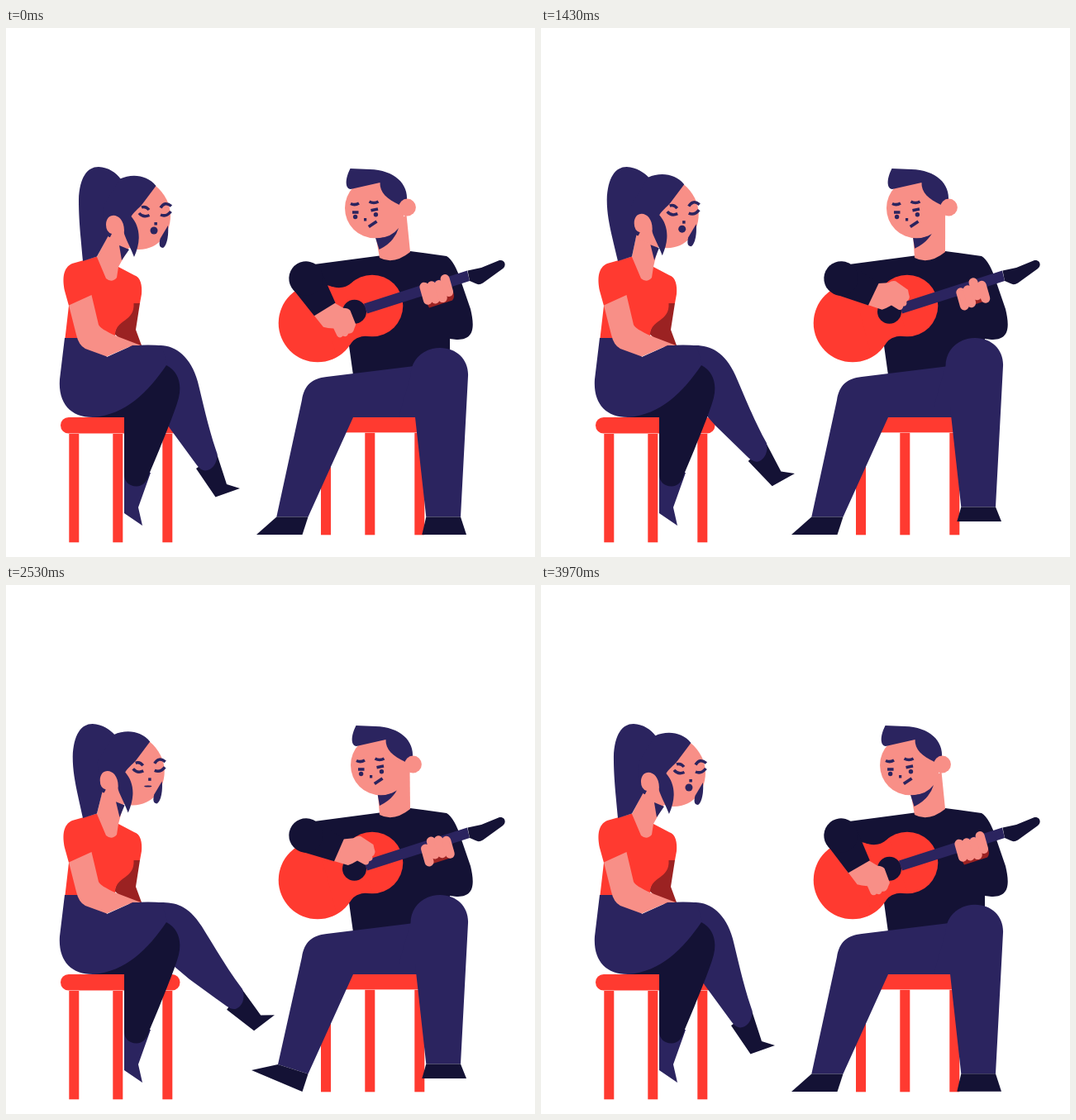
Animation, 640 px wide and 640 px high, one loop 4010 ms. Source, as an HTML page:

```html
<!DOCTYPE html>
<html lang="en">
<head>
<meta charset="utf-8">
<title>Singer and guitarist</title>
<style>
html, body { margin: 0; width: 100%; height: 100%; overflow: hidden; background: #fff; }
svg { display: block; width: 100%; height: 100%; }
</style>
</head>
<body>
<svg id="stage" viewBox="0 0 640 640"></svg>
<script>
const NAVY = '#2b245f', DARK = '#141235', SKIN = '#f88f87', RED = '#ff3a30', SHADE = '#9b2222';
const LOOP = 4010, BEATS = 50; // two identical bars of 50 beats per loop
const stage = document.getElementById('stage');

const path = (fill, d) => `<path fill="${fill}" d="${d}"/>`;
const line = (color, width, d, cap = 'butt') =>
  `<path fill="none" stroke="${color}" stroke-width="${width}" stroke-linecap="${cap}" d="${d}"/>`;
const oval = (fill, x, y, rx, ry = rx) => `<ellipse fill="${fill}" cx="${x}" cy="${y}" rx="${rx}" ry="${ry}"/>`;
const rect = (fill, x, y, w, h, r = 0) =>
  `<rect fill="${fill}" x="${x}" y="${y}" width="${w}" height="${h}" rx="${r}"/>`;
const group = (transform, body) => `<g transform="${transform}">${body}</g>`;
const mix = (a, b, k) => a + (b - a) * k;
const sine = x => (1 - Math.cos(Math.PI * x)) / 2;
const steep = x => x ** 4.6 / (x ** 4.6 + (1 - x) ** 4.6);

// Eased value at beat b from [beat, value] pairs
function keyed(b, keys, ease = sine) {
  if (b <= keys[0][0]) return keys[0][1];
  for (let i = 1; i < keys.length; i++) {
    const [b0, v0] = keys[i - 1], [b1, v1] = keys[i];
    if (b <= b1) return mix(v0, v1, ease((b - b0) / (b1 - b0)));
  }
  return keys[keys.length - 1][1];
}

function stools() {
  const legs = (xs, y, h) => xs.map(x => rect(RED, x, y, 12, h)).join('');
  return rect(RED, 66, 471, 144.5, 19.6, 9.8) + legs([76.3, 129.3, 189.3], 491, 131.3) +
    rect(RED, 395, 471, 108, 18.4) + legs([381, 434.3, 494.3], 489.8, 123.5);
}

function swingingLeg(angle) {
  const c = Math.cos(angle), s = Math.sin(angle);
  const at = (x, y) => {
    const dx = x - 187, dy = y - 405;
    return `${187 + dx * c + dy * s},${405 - dx * s + dy * c} `;
  };
  return path(DARK, `M${at(255, 515)}L${at(267, 552)}L${at(283, 557)}L${at(253.5, 567.5)}L${at(230, 533)}Z`) +
    path(NAVY, `M150,384 L187,384 C205,384 ${at(224, 398)}${at(232, 428)}C${at(238, 452)}${at(245, 485)}${at(255.5, 515)}` +
      `C${at(256, 527)}${at(249, 535)}${at(241, 535.5)}Q${at(236, 535.5)}${at(231, 529)}L${at(198, 484)}L${at(180, 455)}Z`);
}

function girlHead(h, mouth) {
  const x = -13.5 * h, y = -3 * h;
  const at = (px, py, kx = 1, ky = 1) => `${px + x * kx},${py + y * ky} `;
  const neck = path(SKIN, `M110,277 L${at(124, 250)}L${at(151, 262)}L136,289 L134,302 Q128,309 121,303Z`) +
    path(NAVY, `M${at(137, 263, .55, .4)}L${at(149, 268, .75)}L${at(140, 281, .35, 0)}Z`);
  const tail = path(NAVY, `M93,282 C${at(90, 250, .55, 0)}${at(88, 230, 1, 0)}${at(88, 208, 1, 0)}C${at(89, 181, 1, 0)}${at(98, 168, 1, 0)}` +
    `${at(112, 168, 1, 0)}C${at(124, 168.5, 1, 0)}${at(133, 175, 1, 0)}${at(139, 183)}L${at(143, 225)}L${at(124, 251)}L110,276.5Z`);
  const face = group(`translate(${x} ${y})`,
    path(SKIN, 'M181,191 C192,200 199,213 199,227 C199,250 183,268.5 160,268 C150,267.5 142,264 136,259 L138,215Z') +
    path(NAVY, 'M138,182.5 C152,176 171,177.5 181.5,191 L165,213 C160,219 154,223 151.5,228 C162,240 164,257 155,277 C150,264 145,256 142,246 L120,250 L118,215Z') +
    oval(NAVY, 126.5, 249, 4.2) +
    path(SKIN, 'M121,238 C121,221 143,223 143,245 L141,263 L124,257 L128,249 Q121,247 121,238Z') +
    path(NAVY, 'M196,239 C197,250 195,263 190,266 C185,266 185,261 186.5,255Z') +
    line(NAVY, 3.5, 'M187,217.5 Q192,209 200,215.5 M164,217 Q169,215 173,220') +
    line(NAVY, 3.5, 'M161,224 Q166,230 173.5,226.5 M187,226 Q194,229 199.5,222') +
    rect(NAVY, 179.4, 235, 3.5, 3.5) +
    oval(NAVY, 179, 245, 4.5, mouth));
  return neck + tail + face;
}

function girl(h, swing, mouth) {
  return swingingLeg(swing) +
    path(SHADE, 'M150,333 L162,333 L157,365 L164,384 L150,386 L131,370 L138,350Z') +
    path(NAVY, 'M71,375 L65,425 C63,454 78,471 105,471 L143,471 L196,409 L188,384.3 Q178,383 153,384 L122,398 L116,375Z') +
    path(NAVY, 'M143,535 L143,587 L165,602 L160,580 L175,538Z') +
    path(DARK, 'M105,471 C145,468 172,440 194,408 C208,415 213,430 209,447 C206,460 190,500 173,540 C171,549 165,554.5 158,554.5 C148,554.5 143,548 143,540 L143,471Z') +
    path(RED, 'M80,285 L110,276.5 L136,289 L155,299 C163,301 165,312 164,322 L162,333 L154.5,333 C156,356 132,352 132,372 L128,375 H71.5 L76,336 L71,318 C68,303 69,290 80,285Z') +
    path(SKIN, 'M76,335.5 L103.5,323 L112,359 Q114,364 133,372.5 L163,384 L153,384 L122,397.5 L96,388 Q88,384 85,371Z') +
    girlHead(h, mouth);
}

function guyHead(h, blink) {
  const x = 13 * h;
  const neck = path(SKIN, `M${447 + 5 * h},250 L452,278 Q469,287 489,271 L${484.5 + 7.5 * h},226Z`);
  const jaw = path(NAVY, `M${447 + 5 * h},254 Q${465 - 2 * h},${255 - h} ${475 - 3 * h},${242 + 10 * h} ` +
    `Q${470 - 6 * h},${259 + 2 * h} ${451.5 + h},${268 - 2 * h}Z`);
  const brow = 4 * blink, lid = 3.3 * blink;
  const face = group(`translate(${x} 0)`,
    oval(SKIN, 446.3, 218, 36.3) +
    path(NAVY, 'M416.5,170 L440,171 C470,172 487,188 485,210 L476,214 C461,207 452,199 452.5,187 L417,195 C410,194 410,183 416.5,170Z') +
    oval(SKIN, 485.5, 217, 10.4) +
    line(NAVY, 3.5, `M417,${212.5 + brow} Q422,${215 + brow} 427,${212 + brow} M439.5,${210 + brow} Q445,${213 + brow} 450.5,${210 + brow}`) +
    line(NAVY, 3.5, `M419,${223 + lid} h7.5 M441.5,${220.8 + lid} l8.5,-1.8`) +
    (blink < .95 ? oval(NAVY, 422.6, 228.5, 2.7, 2.7 * (1 - blink)) + oval(NAVY, 447.4, 225.8, 2.7, 2.7 * (1 - blink)) : '') +
    rect(NAVY, 433, 230, 3.2, 3.5) +
    line(NAVY, 3.8, 'M438.8,240.5 L448.5,234'));
  return neck + jaw + face;
}

function guyLegs(tapLeft, tapRight) {
  const up = 12 * tapRight, sole = 613 - 16 * tapRight;
  const ankle = `${mix(327.3, 329, tapLeft)},${mix(591.5, 580, tapLeft)}`;
  const toe = `${mix(303, 297, tapLeft)},${mix(613, 587, tapLeft)}`;
  return path(NAVY, `M520,405 L490,409.5 L388,422 C370,424 361,432 358,450 L${ankle} L365.5,591.5 L420,471 L520,471Z`) +
    path(DARK, `M${ankle} L365.5,591.5 L358.5,613 L${toe}Z`) +
    group(`translate(0 ${-up})`,
      path(NAVY, 'M489.5,421 C489.5,401 505,387 525,387 C546,387 560,402 559,421 L550,591.5 L508.3,591.5 L495,471 L475,471Z')) +
    path(DARK, `M508.3,${591.5 - up} L550,${591.5 - up} L557,${sole} L503.3,${sole}Z`);
}

function guitar() {
  return oval(RED, 377, 357, 47.3) + oval(RED, 443, 336, 37.3) +
    path(RED, 'M377,309.7 C394,311 405,321 421,306 L444,373 Q424,370 416,383 L400,398Z') +
    oval(DARK, 421.5, 343.3, 14.5) +
    path(NAVY, 'M433,333.5 L558,293.5 L561,306 L437,345.5Z') +
    path(DARK, 'M558.5,293.5 L575,290 L597,281 C604,280 606,288 600.5,291.5 L577,308.5 Q572,311.5 568,309 L561,306Z');
}

function fingers(b) {
  const poses = [[-4, 0, -2, 3], [-2, -5, -4, 3], [0, -1, -2, -3], [-4, -1, 2, 4]];
  const palm = path(SHADE, 'M505,326 L512,338.5 L540,329.5 Q544,325 540,317Z');
  return palm + poses.map(([a, m, n, z], i) => {
    const pose = i === 2 ? [0, -1, -2, -3] : i === 1 ? [-2, -5, -4, 3] : i === 0 ? [-4, 0, 2, 3] : [-4, -2, 2, 4];
    const s = keyed(b, [[0, pose[0]], [9, pose[1]], [13, pose[2]], [24, pose[3]], [46, pose[3]], [49, pose[0]]]);
    const x = 507 + 8.4 * i + .27 * s, y = 317 - 3.2 * i + .96 * s;
    return line(SKIN, 11, `M${x},${y} l4.5,16`, 'round');
  }).join('');
}

function guy(h, b, tapLeft, tapRight) {
  const strum = keyed(b, [[0, 58.7], [13, 23.6], [24, 78.2], [34.5, 23.6], [44.2, 78.2], [50, 58.7]]);
  const blink = keyed(b, [[19, 0], [22, 1], [26, 1], [29, 0]]);
  const arm = path(SKIN, 'M40,15.3 L61,12.6 Q65,9 69,3 L79,4 Q84,3 82.5,-2 Q87,-5 83.5,-9 Q87,-14 82,-18.5 L79,-22.5 L61,-25.5 Q57,-25 54,-20 L43,-14Z') +
    path(DARK, 'M0,20.5 L43.7,15 L43.7,-15 L0,-20.5Z') + oval(DARK, 0, 0, 20.7);
  return path(DARK, 'M365,287 L452,275.5 L489,270 L533,276 Q543,282 551,308 L562,340 C567,361 567,378 545,377 L537,376 L537,415 L420,420 L413,370 L380,320Z') +
    guyHead(h, blink) + guyLegs(tapLeft, tapRight) + guitar() + fingers(b) +
    group(`translate(363 303) rotate(${strum})`, arm);
}

function draw(now) {
  const b = now % LOOP / LOOP * 2 * BEATS % BEATS;
  const sway = sine(b / 25);
  const tap = x => keyed(x, [[0, 0], [11, 1], [13, 1], [25, 0]]);
  const swing = keyed(b, [[0, 0], [22, .363], [24.5, .363], [46.5, 0]], steep);
  const mouth = keyed(b, [[8, 4.5], [13, 1], [20, 1], [27, 4.5]]);
  stage.innerHTML = stools() + girl(sway, swing, mouth) + guy(sway, b, tap(b), tap(b % 25));
}

const start = performance.now();
function tick() {
  draw(performance.now() - start);
  requestAnimationFrame(tick);
}
tick();
</script>
</body>
</html>
```
